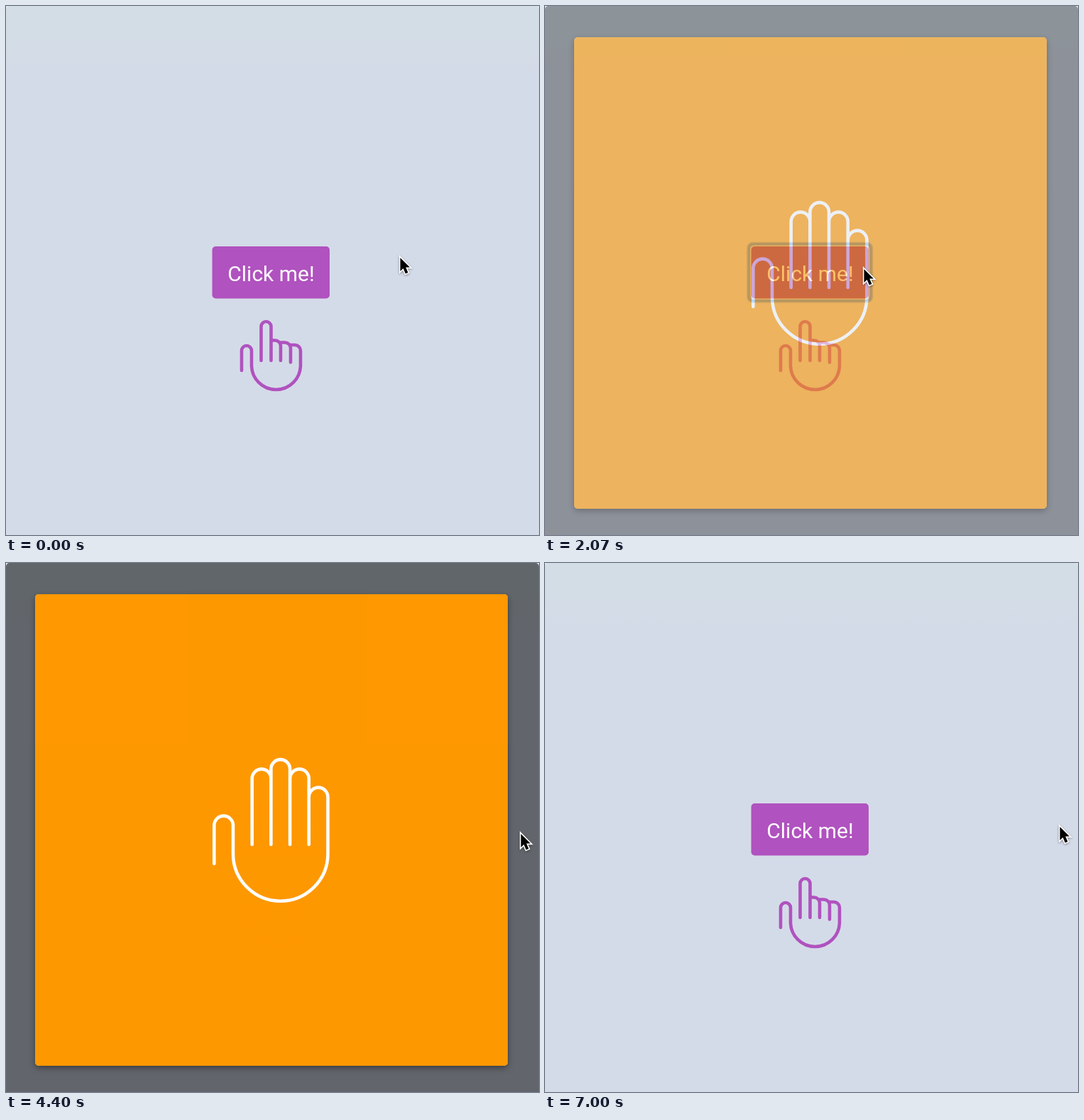
An HTML page that plays this animation: 751x746 px, repeating every 7.07 s.

```html
<!DOCTYPE html>
<html lang="en">
<head>
<meta charset="utf-8">
<title>Click me</title>
<style>
  html, body { margin: 0; width: 100%; height: 100%; overflow: hidden; background: #e2e8f0; }
  svg { display: block; width: 751px; height: 746px; border-radius: 5px 5px 0 0; }
  text { font: 400 30px Roboto, sans-serif; fill: #fff; }
  .line { fill: none; stroke-width: 4.6; stroke-linecap: round; stroke-linejoin: round; }
  #panel { fill: #ff9800; filter: drop-shadow(0 3px 4px rgba(0, 0, 0, .4)); }
  #cursor { filter: drop-shadow(0 1.5px 1.5px rgba(0, 0, 0, .4)); }
  #ring rect { fill: none; }
</style>
</head>
<body>
<svg viewBox="0 0 751 746">
  <defs>
    <linearGradient id="sky" x2="0" y2="1">
      <stop offset=".06" stop-color="#d3dde6"/>
      <stop offset=".12" stop-color="#d4dbe8"/>
    </linearGradient>
  </defs>
  <rect width="751" height="746" fill="url(#sky)"/>

  <g id="ring">
    <rect x="287.500" y="336" width="171.500" height="79.500" rx="5" stroke="#3d8cf0" stroke-opacity=".5" stroke-width="6.500"/>
    <rect x="287.500" y="336" width="171.500" height="79.500" rx="5" stroke="#3d8cf0" stroke-opacity=".8" stroke-width="3.500"/>
    <rect x="290" y="338.500" width="166.500" height="74.500" rx="5" stroke="#c2d3f2" stroke-width="2"/>
  </g>
  <rect id="button" x="290.500" y="339" width="165.500" height="73.500" rx="5"/>
  <text x="373.500" y="388" text-anchor="middle">Click me!</text>
  <path class="line" stroke="#b052bf" d="M332 514V486a7 7 0 0 1 14 0V506.500a34.500 34.500 0 0 0 69 0V486a8 8 0 0 0-8-8h-6
    M359.500 500V452a7 7 0 0 1 14 0V500M373.500 471.500h5.500a8 8 0 0 1 8 8V500M387 474.500h6a8 8 0 0 1 8 8V502.500"/>

  <path id="shade" fill-rule="evenodd" d="M0 0H751V746H0ZM46 44H702a5 5 0 0 1 5 5V704a5 5 0 0 1-5 5H46a5 5 0 0 1-5-5V49a5 5 0 0 1 5-5Z"/>
  <g id="modal">
    <rect id="panel" x="41" y="44" width="666" height="665" rx="5"/>
    <path class="line" stroke="#fff" d="M293.300 424V370a13.350 13.350 0 0 1 26.700 0V410a66.750 66.750 0 0 0 133.500 0V330a13.350 13.350 0 0 0-26.700 0
      M346.700 397V304a13.350 13.350 0 0 1 26.700 0M373.400 397V290.500a13.350 13.350 0 0 1 26.700 0V397
      M400.100 304a13.350 13.350 0 0 1 26.700 0V397"/>
  </g>
  <g id="close">
    <circle r="29.500" fill="#8092b0"/>
    <path d="M-8.500-8.500 8.500 8.500M8.500-8.500-8.500 8.500" stroke="#fff" stroke-width="2" stroke-linecap="round"/>
  </g>
  <g id="cursor">
    <path d="M0 0V19l4.200-4 3.200 7.500 3.600-1.500-3.200-7.400H13.500Z" stroke="#fff" stroke-width="3.200" paint-order="stroke"/>
  </g>
</svg>
<script>
const LOOP = 7070, CLICK = 690, DISMISS = 4380;
const el = id => document.getElementById(id);
const [ring, button, shade, modal, close, cursor] =
  ['ring', 'button', 'shade', 'modal', 'close', 'cursor'].map(el);

const span = (t, from, length) => Math.min(1, Math.max(0, (t - from) / length));
const smooth = p => p * p * (3 - 2 * p);

function bezier(x1, y1, x2, y2) {
  const at = (a, b, u) => 3 * a * u * (1 - u) ** 2 + 3 * b * u * u * (1 - u) + u ** 3;
  return p => {
    let low = 0, high = 1;
    for (let i = 0; i < 20; i++) {
      const mid = (low + high) / 2;
      if (at(x1, x2, mid) < p) low = mid; else high = mid;
    }
    return at(y1, y2, (low + high) / 2);
  };
}
const easeOut = bezier(0, 0, .58, 1);
const ease = bezier(.25, .1, .25, 1);

// Each move is [start, length, distance].
const track = (origin, moves) => t =>
  moves.reduce((sum, [start, length, by]) => sum + by * smooth(span(t, start, length)), origin);
const cursorX = track(555.5, [[70, 550, -106], [2450, 1350, 288.5], [3800, 250, -12.5]]);
const cursorY = track(355, [[70, 550, 16], [3200, 600, 13], [3800, 250, -2], [6250, 650, -10]]);

function draw(t) {
  const open = easeOut(span(t, CLICK, 3300)) * (1 - ease(span(t, DISMISS, 2600)));
  modal.setAttribute('opacity', open);
  shade.setAttribute('opacity', .54 * open ** .9);

  const x = cursorX(t), y = cursorY(t);
  cursor.setAttribute('transform', `translate(${x} ${y})`);
  button.setAttribute('fill', x < 456 ? '#86269e' : '#b052bf');
  ring.setAttribute('opacity', t >= CLICK && t < DISMISS ? 1 : 0);

  const shown = smooth(span(t, 2450, 350));
  close.setAttribute('opacity', shown * (1 - span(t, 3400, 250)));
  close.setAttribute('transform', `translate(703.5 47.5) scale(${1.25 - .25 * shown})`);
}

const begin = performance.now();
function tick() {
  draw((performance.now() - begin) % LOOP);
  requestAnimationFrame(tick);
}
tick();
</script>
</body>
</html>
```
